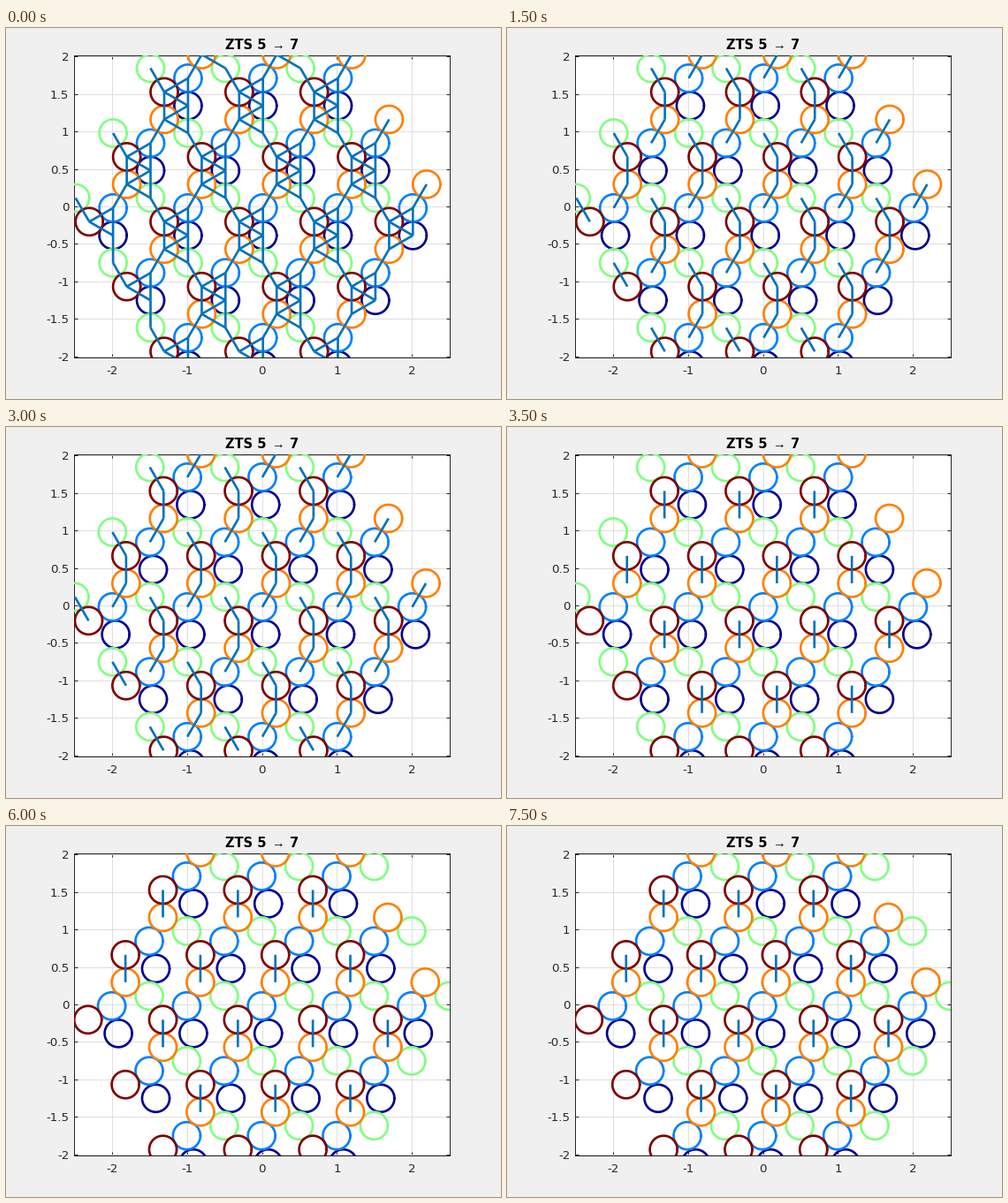
A matplotlib script for the animation above (8000 ms loop, 560 by 420 pixels).

```python
import numpy as np
import matplotlib.pyplot as plt
from matplotlib.animation import FuncAnimation
from matplotlib.collections import LineCollection

W, H, DPI = 560, 420, 100
FRAMES, STEP_MS = 16, 500
PX = 72 / DPI                       # points per pixel
SCALE = 84.8                        # pixels per data unit
LEFT, RIGHT, TOP, BOTTOM = 77.1, 502.1, 31, 373
CX, CY = (LEFT + RIGHT) / 2, (TOP + BOTTOM) / 2
INK = "#262626"

D = (np.sqrt(3) - 1) / 2            # disc diameter
ROW = np.sqrt(3) / 2                # lattice row height
COLORS = {"navy": "#00008f", "blue": "#0080ff", "green": "#80ff80",
          "orange": "#ff8000", "red": "#800000"}
BASIS = {"navy": (0, -D), "blue": (0, 0), "green": (-0.5, D * (ROW - 0.5)),
         "orange": (D / 2, D * ROW), "red": (-D * ROW, -D / 2)}
KINDS = list(COLORS)

# hexagonal patch of 19 cells
CELLS = np.array([(i - (4 - abs(r)) / 2, r * ROW)
                  for r in range(-2, 3) for i in range(5 - abs(r))])
ORIGIN = np.array([0.013, -0.021])
DRIFT = 0.0059                      # navy step per frame, balanced by the others
LOOSE, OPEN, WRAP = 1, 7, 10        # frames where bonds break and green wraps


def centers(kind, n):
    dx = DRIFT * n * (1 if kind == "navy" else -0.25)
    if kind == "green" and n >= WRAP:
        dx += 1
    return CELLS + BASIS[kind] + ORIGIN + (dx, 0)


def find_bonds():
    start = {k: centers(k, 0) for k in KINDS}
    bonds = []
    for i, a in enumerate(KINDS):
        for b in KINDS[i + 1:]:
            gap = start[a][:, None] - start[b][None]
            dist = np.hypot(gap[..., 0], gap[..., 1])
            for p, q in np.argwhere(abs(dist - D) < 0.01):
                bonds.append((a, p, b, q))
    return bonds


BONDS = find_bonds()
CHAIN = [{"green", "red"}, {"red", "orange"}, {"orange", "blue"}]


def holds(a, b, n):
    if n < LOOSE:
        return True
    if n < OPEN:
        return {a, b} in CHAIN
    return {a, b} == {"red", "orange"}


ANGLE = np.append(np.linspace(0, 2 * np.pi, 73), np.nan)
RING = D / 2 * np.column_stack([np.cos(ANGLE), np.sin(ANGLE)])

fig = plt.figure(figsize=(W / DPI, H / DPI), dpi=DPI, facecolor="#f0f0f0")
ax = fig.add_axes([LEFT / W, 1 - BOTTOM / H, (RIGHT - LEFT) / W, (BOTTOM - TOP) / H])
half_x, half_y = (RIGHT - LEFT) / 2 / SCALE, (BOTTOM - TOP) / 2 / SCALE
ax.set(xlim=(-half_x, half_x), ylim=(-half_y, half_y), facecolor="white")
ax.set_axisbelow(True)
xticks, yticks = np.arange(-2, 3), np.arange(-2, 2.1, 0.5)
ax.set_xticks(xticks)
ax.set_yticks(yticks)
ax.grid(color="#dfdfdf", lw=PX)
ax.tick_params(direction="in", length=4.25 * PX, width=PX, color=INK,
               top=True, right=True, labelbottom=False, labelleft=False)
for spine in ax.spines.values():
    spine.set(color=INK, linewidth=PX, zorder=1)


def label(x, y, s, size=13.33, ha="center", color=INK, **font):
    font = {"family": "DejaVu Sans", **font}
    fig.text(x / W, 1 - y / H, s, fontsize=size * PX, ha=ha, va="baseline",
             color=color, **font)


for t in xticks:
    label(CX + t * SCALE, 391.6, f"{t:g}")
for t in yticks:
    label(71.3, CY - t * SCALE + 5, f"{t:g}", ha="right")
label(247.5, 24, "ZTS 5", 14.67, "left", "black", weight="bold")
label(307.5, 24, "\u2192", 14.67, "center", "black", family="Liberation Serif")
label(331.5, 24, "7", 14.67, "right", "black", weight="bold")

rings = {k: ax.plot([], [], color=c, lw=2.67 * PX, solid_capstyle="round",
                    snap=False, zorder=3)[0]
         for k, c in COLORS.items()}
links = LineCollection([], colors="#0072bd", linewidths=2.67 * PX,
                       capstyle="butt", snap=False, zorder=4)
ax.add_collection(links, autolim=False)


def draw(n):
    pos = {k: centers(k, n) for k in KINDS}
    for k, line in rings.items():
        pts = (pos[k][:, None] + RING).reshape(-1, 2)
        line.set_data(pts[:, 0], pts[:, 1])
    links.set_segments([(pos[a][p], pos[b][q])
                        for a, p, b, q in BONDS if holds(a, b, n)])
    return [*rings.values(), links]


anim = FuncAnimation(fig, draw, frames=FRAMES, interval=STEP_MS,
                     repeat=True, repeat_delay=0)
plt.show()
```
